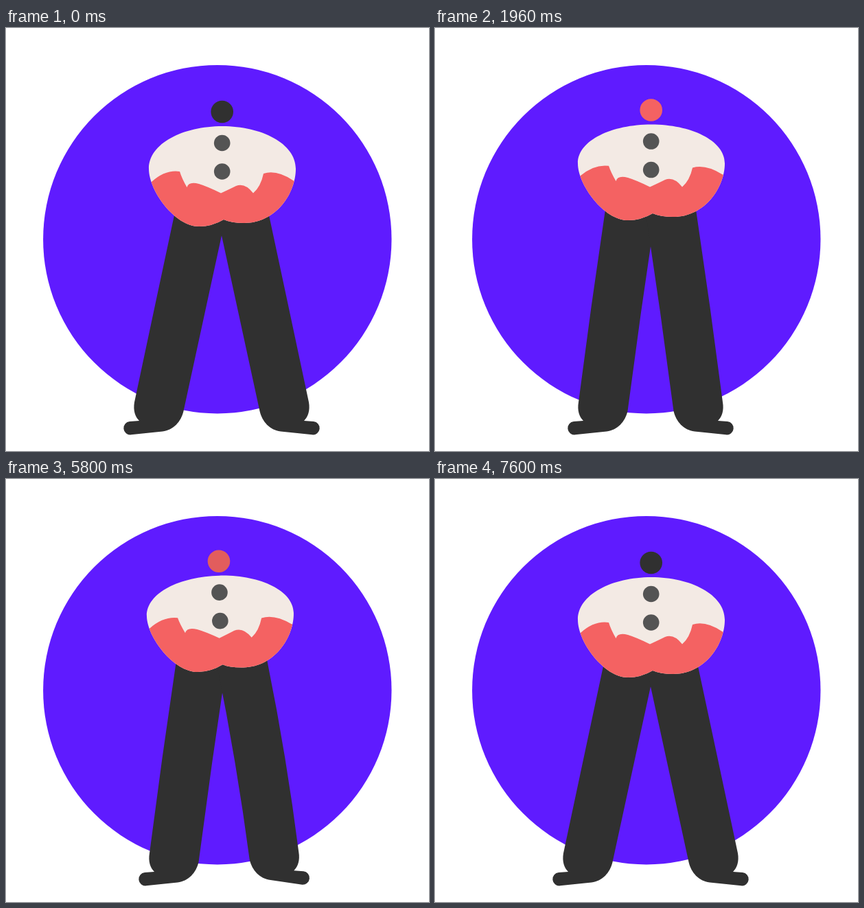
An HTML page with a canvas for the animation above (7640 ms loop, 616x616 px).

```html
<!DOCTYPE html>
<html lang="en">
<head>
<meta charset="utf-8">
<title>Walking light</title>
<style>
html, body { margin: 0; width: 100%; height: 100%; overflow: hidden; background: #fff; }
canvas { display: block; width: 616px; height: 616px; }
</style>
</head>
<body>
<canvas id="stage" width="616" height="616"></canvas>
<script>
const ctx = document.getElementById('stage').getContext('2d');
const LOOP = 7640, STEP = 40, STRIDE = 22;
const MID = 314.7, HIP = 340;
const DARK = [48, 48, 48], GREY = [84, 84, 84], CORAL = [244, 98, 98], AMBER = [248, 174, 28];

const rgb = c => `rgb(${c.map(Math.round)})`;
const mix = (a, b, k) => rgb(a.map((v, i) => v + (b[i] - v) * k));

function ease(t, from, to) {
  const p = Math.min(1, Math.max(0, (t - from) / (to - from)));
  return p * p * (3 - 2 * p);
}

// Rises from 0 to 1 between a and b, falls back between c and d.
const pulse = (t, a, b, c, d) => ease(t, a, b) - ease(t, c, d);

function disc(x, y, r, color) {
  ctx.fillStyle = color;
  ctx.beginPath();
  ctx.arc(x, y, r, 0, Math.PI * 2);
  ctx.fill();
}

function leg(inward, mirrored) {
  const s = STRIDE * inward;
  const swing = Math.sin(Math.PI * inward);
  const bow = 5 * swing + 1.4 * inward;
  const heel = -4 * swing, toe = -2 * swing;
  const hip = 246 + 1.5 * inward;
  ctx.save();
  if (mirrored) {
    ctx.translate(628, 0);
    ctx.scale(-1, 1);
  }
  ctx.fillStyle = rgb(DARK);
  ctx.beginPath();
  ctx.moveTo(hip + 5, 240);
  ctx.lineTo(hip, 268);
  ctx.quadraticCurveTo((hip + 187 + s) / 2 - bow, 406, 187 + s, 545 + toe);
  ctx.bezierCurveTo(185 + s, 557 + toe, 188 + s, 566 + toe, 194 + s, 572 + toe);
  ctx.lineTo(180 + s, 573 + toe);
  ctx.arc(181 + s, 582.7 + toe, 9.7, -Math.PI / 2 - 0.1, Math.PI / 2 - 0.1, true);
  ctx.lineTo(228 + s, 587.5 + heel);
  ctx.bezierCurveTo(244 + s, 585.5 + heel, 255 + s, 573 + heel, 258.5 + s, 558 + heel);
  ctx.quadraticCurveTo(289.7 + s / 2 - bow, 414, 321, 270);
  ctx.lineTo(321, 240);
  ctx.fill();
  ctx.restore();
}

// The top of the body rises less than its belly.
function body(rise) {
  const lift = y => y + rise * (0.27 + 0.73 * Math.min(1, (y - 143) / 75));
  const move = (x, y) => ctx.moveTo(x, lift(y));
  const line = (x, y) => ctx.lineTo(x, lift(y));
  const quad = (a, b, x, y) => ctx.quadraticCurveTo(a, lift(b), x, lift(y));
  const curve = (a, b, c, d, x, y) => ctx.bezierCurveTo(a, lift(b), c, lift(d), x, lift(y));

  ctx.save();
  ctx.beginPath();
  move(208, 205);
  curve(208, 168, 258, 143, 315, 143);
  curve(372, 143, 422, 168, 422, 205);
  curve(422, 240, 394, 284, 347, 284);
  quad(328, 284, 317, 279);
  quad(300, 289, 281, 289);
  curve(246, 289, 208, 237, 208, 205);
  ctx.fillStyle = '#f3eae4';
  ctx.fill();
  ctx.clip();

  // Ragged hem
  ctx.beginPath();
  move(200, 234);
  line(212, 224);
  quad(232, 206, 253, 209);
  quad(256, 219, 263.5, 232);
  quad(266, 223, 281, 227);
  quad(294, 231, 313, 240.5);
  quad(327, 234, 335, 230);
  quad(348, 225, 360, 240.5);
  quad(371, 231, 375, 212);
  quad(394, 206, 418, 222);
  line(440, 230);
  line(440, 310);
  line(200, 310);
  ctx.fillStyle = rgb(CORAL);
  ctx.fill();
  ctx.restore();
}

function head(y, red, turn) {
  ctx.save();
  ctx.translate(MID + turn, y);
  disc(0, 0, 16.3, mix(DARK, CORAL, red));
  ctx.clip();
  // Hair slides in from behind as the head turns.
  ctx.translate((turn - 1) * 16, 0);
  ctx.beginPath();
  ctx.moveTo(-2, -18);
  ctx.lineTo(-2.3, -1.5);
  ctx.lineTo(-4, -1.5);
  ctx.lineTo(-4.5, -5);
  ctx.bezierCurveTo(-7, -5, -6.5, 0, -6, 2);
  ctx.quadraticCurveTo(-7, 8, -14, 8);
  ctx.lineTo(-18, 8);
  ctx.lineTo(-18, -18);
  ctx.fillStyle = rgb(DARK);
  if (turn) ctx.fill();
  ctx.restore();
}

function draw(t) {
  const left = pulse(t, 240, 840, 6240, 6960);
  const right = pulse(t, 930, 1460, 5600, 6120);
  const rise = -9 * pulse(t, 240, 900, 5640, 7340) - 3 * pulse(t, 900, 1200, 1200, 1560);
  const lean = 11 * (pulse(t, 240, 540, 600, 1140) + pulse(t, 6200, 6480, 6600, 7100))
    - 9 * pulse(t, 1000, 1460, 1460, 1920) - 8 * pulse(t, 5600, 5960, 5960, 6240);
  const amber = pulse(t, 880, 1080, 1400, 1600);
  const red = pulse(t, 1560, 1800, 5740, 6060);
  const turn = pulse(t, 3000, 3320, 3880, 4200);
  const lift = rise * 0.27;

  ctx.fillStyle = '#fff';
  ctx.fillRect(0, 0, 616, 616);
  disc(307.8, 307.7, 253.7, '#5f1bff');
  leg(left, false);
  leg(right, true);

  ctx.save();
  ctx.translate(MID, HIP);
  ctx.rotate(lean / 218);
  ctx.translate(-MID, -HIP);
  body(rise);
  disc(MID, 167.5 + lift, 11.8, mix(GREY, AMBER, amber));
  disc(MID, 209 + lift, 11.8, rgb(GREY));
  head(122 + lift, red, turn);
  ctx.restore();
}

const start = performance.now();
function tick() {
  const t = (performance.now() - start) % LOOP;
  draw(Math.floor(t / STEP) * STEP);
  requestAnimationFrame(tick);
}
tick();
</script>
</body>
</html>
```
